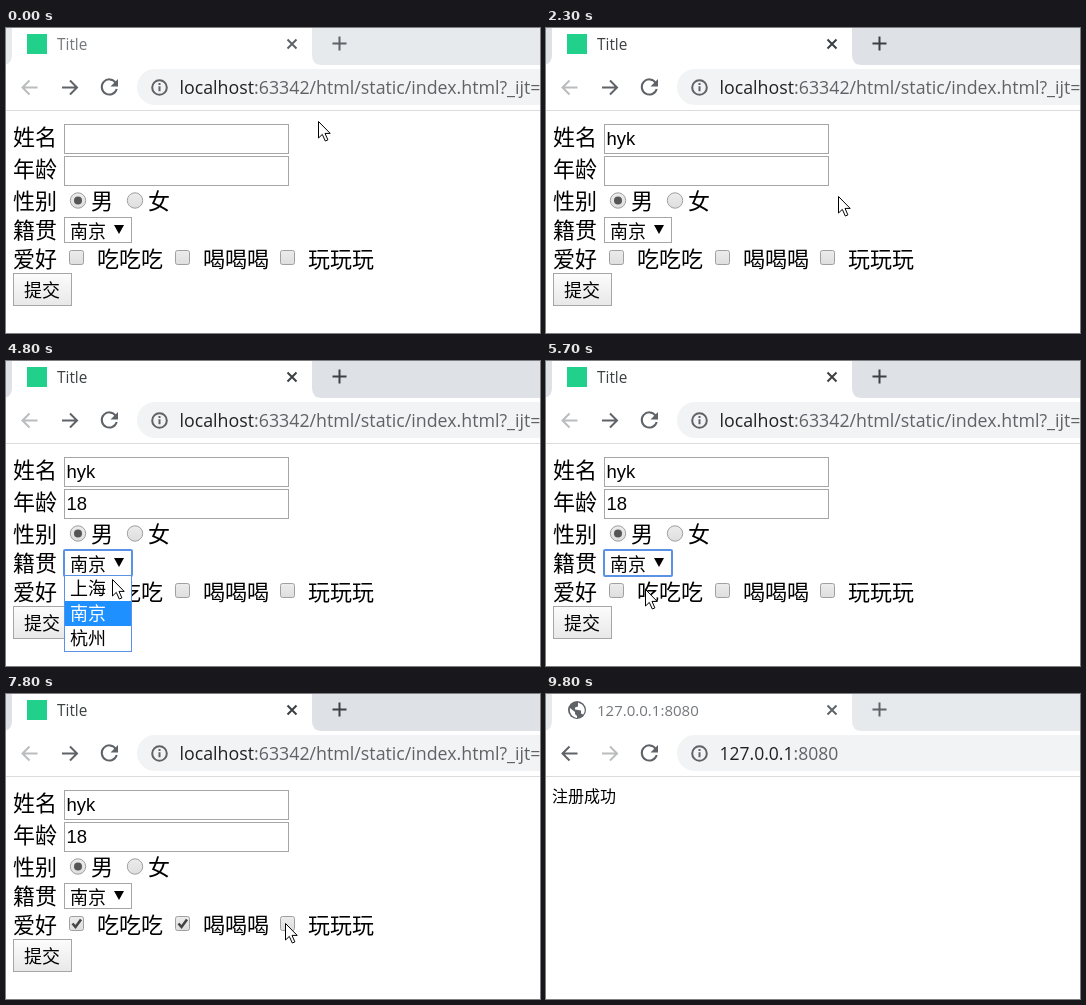
Recreate the animation shown at these times as an HTML page. Size 534 px wide and 305 px high, loop 9.9 s.

```html
<!DOCTYPE html>
<html lang="zh">
<head>
<meta charset="utf-8">
<title>Form</title>
<style>
  html, body { margin: 0; width: 100%; height: 100%; overflow: hidden; background: #fff; }
  svg { display: block; }
  text { white-space: pre; }
  .cjk { font-family: "Noto Sans CJK SC", "Noto Sans CJK", sans-serif; fill: #000; }
  .ui { font-family: "Open Sans", "Noto Sans", sans-serif; }
  .field { font: 18.5px "Liberation Sans", sans-serif; fill: #000; }
  .icon { fill: none; stroke: #5f6368; stroke-width: 2; }
</style>
</head>
<body>
<svg id="stage" width="534" height="305" viewBox="0 0 534 305">
  <defs>
    <linearGradient id="btn" x2="0" y2="1"><stop stop-color="#fcfcfc"/><stop offset="1" stop-color="#e8e8e8"/></linearGradient>
    <linearGradient id="box" x2="0" y2="1"><stop stop-color="#ececec"/><stop offset="1" stop-color="#dedede"/></linearGradient>
    <filter id="shadow" x="-5%" y="-5%" width="110%" height="115%">
      <feDropShadow dx="0" dy="1" stdDeviation="1.3" flood-opacity=".45"/>
    </filter>
  </defs>
</svg>
<script>
const LOOP = 9900, STEP = 100;
const LINE = '#a6a6a6', FOCUS = '#5a93e6';
const stage = document.getElementById('stage');

function add(parent, tag, attrs = {}, text) {
  const el = document.createElementNS('http://www.w3.org/2000/svg', tag);
  for (const k in attrs) el.setAttribute(k, attrs[k]);
  if (text !== undefined) el.textContent = text;
  parent.appendChild(el);
  return el;
}
const group = (parent = stage) => add(parent, 'g');
const rect = (p, x, y, width, height, attrs) => add(p, 'rect', { x, y, width, height, ...attrs });
const path = (p, d, attrs) => add(p, 'path', { d, ...attrs });
const cjk = (p, x, y, size, s) => add(p, 'text', { x, y, class: 'cjk', 'font-size': size }, s);
const ui = (p, x, y, size, s, fill) => add(p, 'text', { x, y, class: 'ui', 'font-size': size, fill }, s);
const focusRing = (p, x, y, w, h) => rect(p, x, y, w, h, { fill: 'none', stroke: FOCUS, 'stroke-width': 2, rx: 1 });
const show = (el, on) => el.setAttribute('visibility', on ? 'inherit' : 'hidden');

// Browser frame
const strip = rect(stage, 0, 0, 534, 37);
path(stage, 'M-4 37Q6 37 6 27V0H306V27Q306 37 316 37Z', { fill: '#fff' });
const tabIcons = [
  path(stage, 'M281.5 11.5l9 9m0-9l-9 9', { class: 'icon' }),
  path(stage, 'M326.5 15.5h14m-7-7v14', { class: 'icon' })
];
rect(stage, 0, 82, 534, 1, { fill: '#dcdcdc' });
rect(stage, 131, 41, 430, 36, { rx: 18, fill: '#f1f3f4' });
const back = path(stage, 'M31.5 59.5H16.5m7-7l-7 7 7 7', { class: 'icon' });
const forward = path(stage, 'M56 59.5H71m-7-7l7 7-7 7', { class: 'icon' });
path(stage, 'M109.6 54.6A7.6 7.6 0 1 0 110.7 61', { class: 'icon' });
path(stage, 'M112 51v7.5h-7.5z', { fill: '#5f6368' });
add(stage, 'circle', { cx: 153.5, cy: 59.5, r: 7.3, class: 'icon' });
path(stage, 'M153.5 58.3v5M153.5 55v2', { class: 'icon' });

function address(p, size, host, rest) {
  const t = ui(p, 173.5, 66, size, '', '#5f6368');
  add(t, 'tspan', { fill: '#202124' }, host);
  add(t, 'tspan', {}, rest);
}

// Form page
const form = group();
rect(form, 21, 6, 20, 20, { fill: '#21d08a' });
const formTitle = ui(form, 51, 22, 15.4, 'Title');
address(form, 17.8, 'localhost', ':63342/html/static/index.html?_ijt=');
[['姓名', 117], ['年龄', 149], ['性别', 181], ['籍贯', 210], ['爱好', 239]]
  .forEach(([s, y]) => cjk(form, 7, y, 22, s));

function input(y) {
  rect(form, 58.5, y + .5, 224, 29, { fill: '#fff', stroke: LINE });
  const ring = focusRing(form, 58, y, 225, 30);
  const value = add(form, 'text', { x: 60.5, y: y + 20.5, class: 'field' });
  const caret = rect(form, 0, y + 6, 1.3, 19, { fill: '#000' });
  return (text, focus, caretOn) => {
    show(ring, focus);
    if (value.textContent !== text) value.textContent = text;
    caret.setAttribute('x', 60.5 + (text ? value.getComputedTextLength() : 0));
    show(caret, focus && caretOn);
  };
}
const nameInput = input(96), ageInput = input(128);

[[72, '男', 85], [129, '女', 142]].forEach(([cx, s, x], i) => {
  add(form, 'circle', { cx, cy: 172.5, r: 7.7, fill: 'url(#box)', stroke: '#a0a0a0' });
  if (!i) add(form, 'circle', { cx, cy: 172.5, r: 4, fill: '#555' });
  cjk(form, x, 181, 22, s);
});

rect(form, 58.5, 189.5, 67, 25, { fill: '#fff', stroke: LINE });
const selectRing = focusRing(form, 58, 189, 68, 26);
cjk(form, 64, 210, 18, '南京');
path(form, 'M108 197h10l-5 9z', { fill: '#000' });

const ticks = [[63, '吃吃吃', 91], [169, '喝喝喝', 197], [274, '玩玩玩', 302]].map(([x, s, tx]) => {
  rect(form, x + .5, 222.5, 14, 14, { rx: 2, fill: 'url(#box)', stroke: '#a0a0a0' });
  cjk(form, tx, 239, 22, s);
  return path(form, `M${x + 3.5} 229.5l3 3.5 5.5-7.5`, { fill: 'none', stroke: '#444', 'stroke-width': 2.6 });
});

const submit = rect(form, 7.5, 245.5, 58, 32, { fill: 'url(#btn)', stroke: LINE });
cjk(form, 18, 269, 18, '提交');

// Suggestion popups
function popup(top, items) {
  const g = group(form);
  rect(g, 55.5, top, 242, 22 + 45 * items.length, { rx: 4, fill: '#fff', filter: 'url(#shadow)' });
  items.forEach((s, i) => ui(g, 71, top + 38 + 45 * i, 16.2, s, '#222'));
  return g;
}
const popups = [
  [popup(127, ['hyk', 'hykk', 'hhh', 'houlinshuwu']), 400, 1100],
  [popup(127, ['hyk', 'hykk']), 1100, 2100],
  [popup(158, ['18', '20', '28']), 2600, 3300],
  [popup(158, ['18']), 3300, 4000]
];

// Select list
const LIST_TOP = 215, ROW = 25;
const list = group(form);
rect(list, 58.5, LIST_TOP - .5, 67, 3 * ROW + 1, { fill: '#fff', stroke: FOCUS });
const options = ['上海', '南京', '杭州'].map((s, i) => [
  rect(list, 59, LIST_TOP + ROW * i, 66, ROW, { fill: '#1e90ff' }),
  cjk(list, 64, LIST_TOP + 19 + ROW * i, 18, s)
]);

// Result page
const result = group();
add(result, 'circle', { cx: 31, cy: 16, r: 9, fill: '#5f6368' });
path(result, 'M24 14l5 4v2l2 2v2c-5-1-8-5-7-10zM32 8.5l4 2c4 4 3 8 1 10l-2-1v-3l-6-1v-2l3-1v-2z', { fill: '#fff' });
const resultTitle = ui(result, 51, 22, 15, '127.0.0.1:8080');
address(result, 17.5, '127.0.0.1', ':8080');
cjk(result, 6, 108, 16, '注册成功');

// Pointer
const pointer = group();
const arrow = path(pointer, 'M.5.5V17l3.8-3.6 3 6.6 2.6-1.1-2.9-6.5h5.2z', { fill: '#fff', stroke: '#000' });
const beam = path(pointer, 'M-3 -7.5h2.5l.5.5.5-.5H3M0-7V7M-3 7.5h2.5l.5-.5.5.5H3', { fill: 'none', stroke: '#000' });

// time, x, y
const route = [
  [0, 312, 93], [300, 220, 110], [1600, 220, 110], [2100, 378, 190], [2500, 206, 145],
  [3600, 206, 145], [4000, 447, 205], [4400, 258, 205], [4600, 112, 203], [4700, 110, 204],
  [4800, 106, 218], [5200, 100, 270], [5300, 100, 270], [5500, 100, 250], [5700, 99, 228],
  [6300, 82, 233], [6500, 77, 226], [6600, 77, 226], [6700, 72, 230], [7100, 170, 230],
  [7300, 174, 231], [7800, 279, 229], [7900, 279, 229], [8200, 30, 262], [9000, 30, 264],
  [9400, 540, 92], [LOOP, 540, 92]
];
function place(t) {
  const i = route.findIndex(k => k[0] > t);
  const [t0, x0, y0] = route[i - 1], [t1, x1, y1] = route[i];
  const p = (t - t0) / (t1 - t0);
  return [x0 + (x1 - x0) * p, y0 + (y1 - y0) * p];
}

// Last value whose start time has passed
const at = (t, table) => table.filter(([start]) => start <= t).pop()[1];
const within = (t, a, b) => t >= a && t < b;

function draw(t) {
  const active = within(t, 100, 9800), done = t >= 8400;
  const titleColor = active ? '#3c4043' : '#74777b';
  strip.setAttribute('fill', active ? '#dee1e6' : '#e7eaed');
  formTitle.setAttribute('fill', titleColor);
  resultTitle.setAttribute('fill', titleColor);
  tabIcons.forEach(icon => icon.style.stroke = active ? '#3c4043' : '#5f6368');
  show(form, !done);
  show(result, done);
  back.style.stroke = done ? '#5f6368' : '#babcbe';
  forward.style.stroke = done ? '#babcbe' : '#5f6368';

  nameInput(at(t, [[0, ''], [800, 'h'], [1100, 'hy'], [1200, 'hyk']]), within(t, 300, 2100), true);
  ageInput(at(t, [[0, ''], [3300, '1'], [3500, '18']]), within(t, 2500, 4600), !within(t, 3100, 3300));
  popups.forEach(([g, a, b]) => show(g, within(t, a, b)));

  const [x, y] = place(t);
  show(selectRing, !done && within(t, 4600, 6700));
  show(list, within(t, 4700, 5600));
  const hover = t < 4900 ? 1 : Math.max(0, Math.min(2, Math.floor((y - LIST_TOP) / ROW)));
  options.forEach(([bar, label], i) => {
    bar.setAttribute('opacity', i === hover ? 1 : 0);
    label.style.fill = i === hover ? '#fff' : '#000';
  });
  ticks.forEach((tick, i) => show(tick, t >= [6700, 7300, 7900][i]));
  submit.setAttribute('fill', t >= 8300 ? '#dcdcdc' : 'url(#btn)');

  const typing = !done && x > 58 && x < 283 && y > 96 && y < 158;
  pointer.setAttribute('transform', `translate(${Math.round(x)} ${Math.round(y)})`);
  show(arrow, !typing);
  show(beam, typing);
}

const begin = performance.now();
function frame() {
  const t = (performance.now() - begin) % LOOP;
  draw(Math.floor(t / STEP) * STEP);
  requestAnimationFrame(frame);
}
frame();
</script>
</body>
</html>
```
